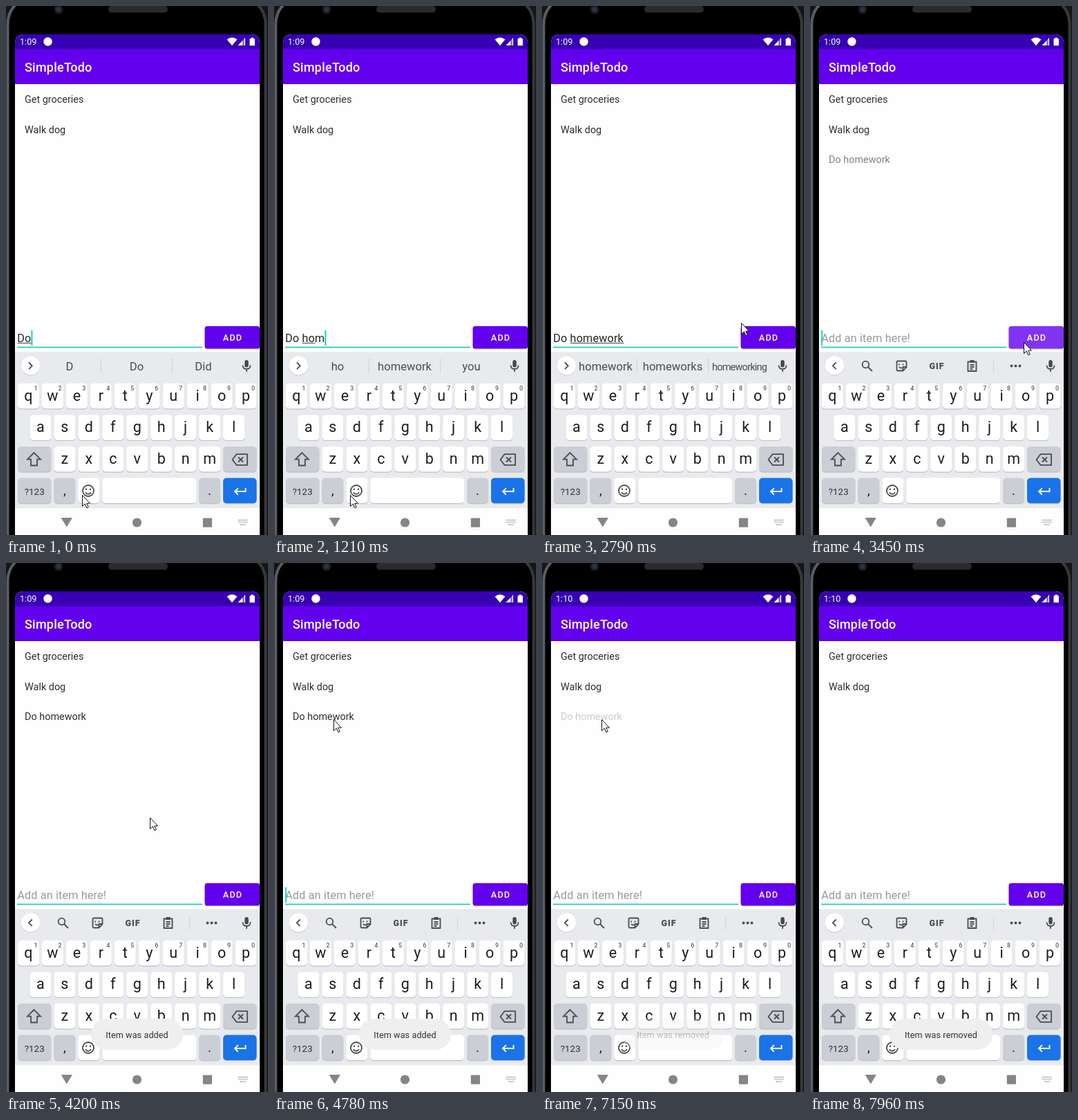
Recreate the animation shown at these times as an HTML page. Size 379x765 px, loop 8 s.

```html
<!DOCTYPE html>
<html lang="en">
<head>
<meta charset="utf-8">
<title>Todo list</title>
<style>
  html, body { margin: 0; width: 100%; height: 100%; overflow: hidden; background: #000; }
  svg { display: block; width: 379px; height: 765px; }
  text { font-family: Roboto, sans-serif; white-space: pre; }
  .mid { text-anchor: middle; }
  .item { font-size: 14.42px; fill: #2e2e2e; }
  .field { font-size: 16.23px; letter-spacing: .15px; }
  .word { font-size: 16.6px; fill: #4a4d51; }
  .word.long { font-size: 14.5px; letter-spacing: -.8px; }
  .key { font-size: 21.5px; fill: #1c1d1f; }
  .mark { font-size: 19px; }
  .mode { font-size: 13.4px; fill: #2e3033; }
  .hint { font-size: 9px; fill: #5b5e63; font-weight: 500; }
  .toast { font-size: 12.62px; letter-spacing: .1px; fill: #333; }
  .line { fill: none; stroke: #4a4d51; stroke-width: 1.8; }
</style>
</head>
<body>
<svg viewBox="0 0 379 765">
  <!-- phone body -->
  <linearGradient id="rim">
    <stop offset="0" stop-color="#5c5c66"/><stop offset="1" stop-color="#38383c"/>
  </linearGradient>
  <rect width="379" height="765" fill="#161618"/>
  <rect x="2.5" y="-14" width="373" height="850" rx="40" fill="#000" stroke="url(#rim)" stroke-width="4"/>
  <circle cx="76" cy="5" r="6.5" fill="#1b1d21"/>
  <circle cx="76" cy="5" r="3.4" fill="#2c3442"/>
  <rect x="148" y="0" width="86" height="9.5" rx="4.5" fill="#2b2b2d"/>

  <!-- app -->
  <path d="M13 765V54q0-13 13-13H354q13 0 13 13V765z" fill="#fefefe"/>
  <path d="M13 63V54q0-13 13-13H354q13 0 13 13V63z" fill="#3700b3"/>
  <rect x="13" y="62.5" width="354" height="50.5" fill="#6200ee"/>
  <text id="clock" x="20" y="56" font-size="12.62" fill="#fff"></text>
  <circle cx="60.5" cy="51.5" r="6.2" fill="#fff"/>
  <path d="M327 57.3L319.6 48.4Q327 42.6 334.4 48.4z" fill="#fff"/>
  <path d="M335.5 57L346 46V57z" fill="#fff" opacity=".45"/>
  <path d="M335.5 57L342 50.5V57zM344.8 47.2L346 46V57H344.8z" fill="#fff"/>
  <path d="M352.5 47.2h2v-1.5h3.4v1.5h2v10h-7.4z" fill="#fff"/>
  <text x="27" y="95" font-size="18.03" font-weight="500" letter-spacing=".22" fill="#fff">SimpleTodo</text>
  <text class="item" x="27" y="140.2">Get groceries</text>
  <text class="item" x="27" y="183.6">Walk dog</text>
  <text class="item" id="newItem" x="27" y="226.9">Do homework</text>

  <!-- input row -->
  <text class="field" id="placeholder" x="16.2" y="486" fill="#9a9a9a">Add an item here!</text>
  <text class="field" id="typed" x="16.2" y="486" fill="#262626"></text>
  <rect id="composing" y="487" height="1" fill="#444"/>
  <rect x="16" y="492.7" width="268" height="1.7" fill="#1ec8b8"/>
  <rect id="caret" y="469" width="2" height="22" fill="#10d2c2"/>
  <rect x="288" y="464.5" width="79" height="32" rx="4" opacity=".2"/>
  <rect x="287.5" y="463" width="79.5" height="32.5" rx="3.6" fill="#6200ee"/>
  <rect id="ripple" x="287.5" y="463" width="79.5" height="32.5" rx="3.6" fill="#fff"/>
  <text class="mid" x="328" y="484" font-size="12.62" font-weight="500" letter-spacing="1.13" fill="#fff">ADD</text>

  <!-- keyboard -->
  <rect x="13" y="500.5" width="354" height="226" fill="#e8eaed"/>
  <g id="keys"></g>
  <circle cx="35.5" cy="521" r="13.8" opacity=".1"/>
  <circle cx="35.5" cy="520" r="13.6" fill="#fff"/>
  <path id="chevron" class="line"/>
  <g id="words">
    <text class="word mid" x="92" y="526.8"></text>
    <text class="word mid" x="189" y="526.8"></text>
    <text class="word mid" x="285.5" y="526.8"></text>
    <path d="M137.5 509.5V531M240.5 509.5V531" stroke="#d0d3d7"/>
  </g>
  <g id="tools" class="line">
    <circle cx="80.5" cy="518.5" r="4.8"/>
    <path d="M84 522l6 6"/>
    <path d="M127 513.5h11q1.5 0 1.5 1.5v7.5l-5 5h-7.5q-1.5 0-1.5-1.5v-11q0-1.5 1.5-1.5zM139 522h-4.5v5.5M129 517.5v2M134.5 517.5v2M128.8 522q2 2.3 4.5 1"/>
    <text class="mid" x="183.5" y="524.5" font-size="12.5" font-weight="900" letter-spacing="1" fill="#4a4d51" stroke="none">GIF</text>
    <path d="M228.5 514.5h12v13.5h-12zM231.5 519h6M231.5 522h6M231.5 525h4"/>
    <path d="M231.5 514h6" stroke-width="4"/>
    <path d="M265.5 511V531" stroke="#d0d3d7" stroke-width="1"/>
    <path d="M291.5 520.5h13" stroke-width="4" stroke-linecap="round" stroke-dasharray="0 6"/>
  </g>
  <rect x="345.3" y="512" width="5.4" height="10.5" rx="2.7" fill="#45484c"/>
  <path class="line" d="M342.5 519.5q0 5.5 5.5 5.5t5.5-5.5M348 525v4"/>

  <!-- key symbols -->
  <path class="line" d="M40.5 646l-9.5 9.700h5v8.800h9v-8.800h5z"/>
  <path class="line" d="M327.500 656l6-7.800h15.500v15.600h-15.500zM336 652.500l7 7m0-7l-7 7"/>
  <g class="line">
    <circle cx="119" cy="701" r="8"/>
    <path d="M114.800 703.300q4.200 5 8.400 0"/>
    <path d="M116 698.700h6.500" stroke-width="2.400" stroke-linecap="round" stroke-dasharray="0 6"/>
  </g>
  <path d="M346.500 697v5H331m4.800-4.800L331 702l4.800 4.800" fill="none" stroke="#fff" stroke-width="1.900"/>

  <!-- navigation bar -->
  <path d="M13 726.500H367V765H16q-3 0-3-4z" fill="#fefefe"/>
  <g fill="#858585">
    <path d="M80.500 740h14.500q1 0 .4 1l-7 11.500q-.6 1-1.200 0l-7-11.500q-.6-1 .3-1z"/>
    <circle cx="189.500" cy="747" r="6.600"/>
    <rect x="284.800" y="740.600" width="13.200" height="13.200" rx="1"/>
  </g>
  <path d="M336 743.500h13.500M336 746.700h13.500M339 750h7.500" stroke="#b0b0b0" stroke-width="1.800" stroke-dasharray="1.800 1.100"/>

  <g id="toast">
    <rect y="659" height="45" rx="22.500" fill="#efefef"/>
    <text class="toast mid" x="189.500" y="686.800"></text>
  </g>
  <path id="pointer" d="M.5 .5V16.500L4.300 13 6.900 18.800 9.200 17.800 6.700 12.200H11.500z" fill="#fff" stroke="#111"/>
</svg>
<script>
const LOOP = 8000, TICK = 143, TICK_OFFSET = 50;
const TASK = 'Do homework', ADDED = 3330, REMOVED = 7000;

const $ = id => document.getElementById(id);
const show = (el, on) => { el.style.display = on ? '' : 'none'; };
const set = (el, attrs) => { for (const k in attrs) el.setAttribute(k, attrs[k]); };
const ramp = (t, from, to) => Math.min(1, Math.max(0, (t - from) / (to - from)));
const easeOut = u => 1 - (1 - u) ** 3;

function buildKeys() {
  const pitch = 34.95, gray = '#cbced4';
  const left = col => 17 + pitch * col;
  const top = row => 545.8 + 45.6 * row;
  let svg = '';
  const key = (row, col, span, fill, text = '', cls = '') => {
    const x = left(col), y = top(row), w = pitch * span - 4;
    const box = (dy, color) =>
      `<rect x="${x}" y="${y + dy}" width="${w}" height="36.500" rx="5" fill="${color}"/>`;
    svg += box(1.2, '#bdc0c5') + box(0, fill) +
      `<text class="key mid ${cls}" x="${x + w / 2}" y="${y + 24.8}">${text}</text>`;
  };
  ['qwertyuiop', 'asdfghjkl', 'zxcvbnm'].forEach((letters, row) =>
    [...letters].forEach((char, i) => key(row, i + row * (row + 1) / 4, 1, '#fff', char)));
  for (let i = 0; i < 10; i++)
    svg += `<text class="hint mid" x="${left(i) + 26}" y="556">${(i + 1) % 10}</text>`;
  for (const row of [2, 3]) {
    key(row, 0, 1.5, gray, row === 3 ? '?123' : '', 'mode');
    key(row, 8.5, 1.5, row === 3 ? '#1a73e8' : gray);
  }
  key(3, 1.5, 1, gray, ',', 'mark');
  key(3, 2.5, 1, '#fff');
  key(3, 3.5, 4, '#fff');
  key(3, 7.5, 1, gray, '.', 'mark');
  $('keys').innerHTML = svg;
}

// Typing pace: [ms, letters typed so far], even in between
const pace = [[0, 2], [280, 3], [400, 4], [960, 5], [1460, 7], [1940, 11]];
function typedCount(t) {
  let count = pace[0][1];
  for (let i = 1; i < pace.length; i++)
    count += (pace[i][1] - pace[i - 1][1]) * ramp(t, pace[i - 1][0], pace[i][0]);
  return Math.floor(count + 1e-6);
}

function suggest(part) {
  if (part.length > 2)
    return [part, part === 'homework' ? 'homeworks' : 'homework', 'homeworking'];
  return { Do: ['D', 'Do', 'Did'], h: ['h', 'have', 'how'], ho: ['ho', 'homework', 'you'] }[part]
    || ['you', 'the', 'have'];
}

// Pointer hops: start, end, x, y
const hops = [[2380, 2624, 288, 445], [2640, 2767, 288, 458], [2800, 3053, 309, 486],
  [4070, 4769, 86, 226], [7534, 7724, 119, 324]];
function pointerAt(t) {
  let x = 110, y = 707;
  for (const [from, to, toX, toY] of hops) {
    const u = easeOut(ramp(t, from, to));
    x += (toX - x) * u;
    y += (toY - y) * u;
  }
  return [x, y];
}

const caretOn = t => t < ADDED ? t < 2500 : (t - ADDED - 100) % 1000 < 500;

function drawField(t) {
  const text = t < ADDED ? TASK.slice(0, typedCount(t)) : '';
  const field = $('typed');
  field.textContent = text;
  const widthOf = n => n ? field.getSubStringLength(0, n) : 0;

  // The keyboard marks the current word a moment after each key
  const from = text.lastIndexOf(' ') + 1;
  const to = text ? Math.max(from, typedCount(t - 250)) : from;
  set($('composing'), { x: 16.6 + widthOf(from), width: widthOf(to) - widthOf(from) });
  set($('caret'), { x: 16.2 + widthOf(text.length) });
  show($('caret'), caretOn(t));
  show($('placeholder'), !text);

  show($('words'), text);
  show($('tools'), !text);
  set($('chevron'), { d: text ? 'M33 515.5l4.800 4.800-4.800 4.800' : 'M37.800 515.500l-4.800 4.800 4.800 4.800' });
  const labels = $('words').querySelectorAll('text');
  suggest(text.slice(from, to)).forEach((word, i) => {
    labels[i].textContent = word;
    labels[i].classList.toggle('long', word.length > 10);
  });
}

function drawMotion(t) {
  $('newItem').style.opacity = ramp(t, 3250, 3400) - ramp(t, 6950, 7090);
  $('ripple').style.opacity = .2 * Math.sin(Math.PI * ramp(t, 3150, 3560));

  const [plate, message] = $('toast').children;
  const removed = t > REMOVED, width = removed ? 149 : 133;
  set(plate, { x: 189.5 - width / 2, width });
  message.textContent = removed ? 'Item was removed' : 'Item was added';
  $('toast').style.opacity = ramp(t, 3380, 3800) - ramp(t, 5460, 5880) + ramp(t, 6930, 7353);

  set($('pointer'), { transform: `translate(${pointerAt(t).map(Math.round)})` });
  show($('pointer'), t < 7700);
}

function draw(t) {
  $('clock').textContent = t < 5820 ? '1:09' : '1:10';
  drawField(t);
  drawMotion(Math.floor((t - TICK_OFFSET) / TICK) * TICK + TICK_OFFSET);
}

buildKeys();
const start = performance.now();
function tick() {
  draw((performance.now() - start) % LOOP);
  requestAnimationFrame(tick);
}
tick();
</script>
</body>
</html>
```
